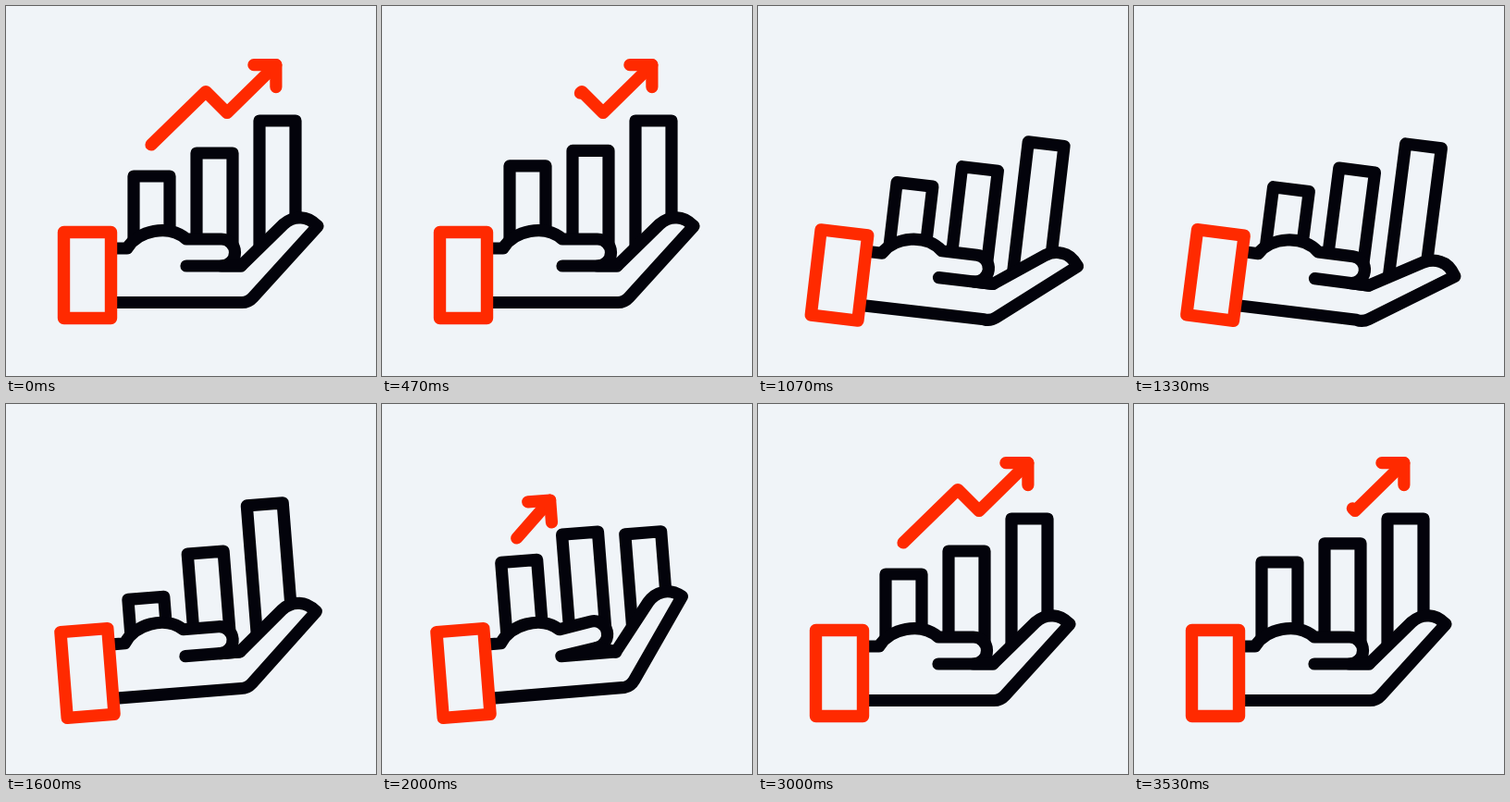
An HTML page with a canvas that plays this animation: 400 px wide and 400 px high, repeating every 3.6 s.

```html
<!DOCTYPE html>
<html lang="en">
<head>
<meta charset="utf-8">
<title>Growth in hand</title>
<style>
html, body { margin: 0; width: 100%; height: 100%; overflow: hidden; background: #f0f4f8; }
canvas { display: block; width: 400px; height: 400px; }
</style>
</head>
<body>
<canvas id="stage" width="400" height="400"></canvas>
<script>
const ctx = document.getElementById('stage').getContext('2d');
const BG = '#f0f4f8', RED = '#ff2a00', INK = '#03030b', WEIGHT = 13.2;
const LOOP = 3600, CYCLE = 3000, STEP = 1000 / 15;
const CUFF = [88, 291], KNUCKLE = [254, 281], THUMB = [193, 270];
const rad = deg => deg * Math.PI / 180;

// Monotone cubic through [time, value] keys
function track(keys) {
  const slope = i => (keys[i + 1][1] - keys[i][1]) / (keys[i + 1][0] - keys[i][0]);
  const tangent = i => {
    if (i === 0 || i === keys.length - 1) return 0;
    const a = slope(i - 1), b = slope(i);
    return a * b <= 0 ? 0 : 2 * a * b / (a + b);
  };
  return t => {
    if (t <= keys[0][0]) return keys[0][1];
    const i = keys.findIndex(k => k[0] >= t) - 1;
    if (i < 0) return keys[keys.length - 1][1];
    const [t0, v0] = keys[i], [t1, v1] = keys[i + 1], w = t1 - t0;
    const u = (t - t0) / w, u2 = u * u, u3 = u2 * u;
    return v0 * (2 * u3 - 3 * u2 + 1) + v1 * (3 * u2 - 2 * u3)
      + w * (tangent(i) * (u3 - 2 * u2 + u) + tangent(i + 1) * (u3 - u2));
  };
}

const tilt = track([[870, 0], [1070, 6.8], [1200, 9.3], [1333, 7.3], [1600, -4.5],
  [1800, -5.6], [2000, -4.5], [2130, -1.5], [2270, 0]]);
const flex = track([[870, 0], [1070, 9], [1260, 15], [1333, 14], [1600, 4],
  [1800, -5], [1940, -8.5], [2000, -8], [2270, 0]]);
const dip = track([[1220, 0], [1333, 4.5], [1400, 12], [1600, 31], [1800, -9],
  [1900, -13], [2000, -9], [2133, 0]]);
const tailOut = track([[300, 0], [533, 111], [800, 160], [960, 245]]);
const headOut = track([[560, 189], [800, 217], [940, 253]]);
const headIn = track([[1890, 0], [2200, 189]]);
const fadeSize = track([[900, 1], [990, 0]]);

const bars = [
  { x: 138, top: 184, bottom: 262, hop: 13 },
  { x: 206, top: 159, bottom: 260, hop: 16 },
  { x: 274, top: 124, hop: 13 }
];

function hop(t, peak) {
  const d = Math.abs(t - peak) / 270;
  return d < 1 ? Math.cos(d * Math.PI / 2) ** 2 : 0;
}

function rotateAbout([x, y], deg) {
  ctx.translate(x, y);
  ctx.rotate(rad(deg));
  ctx.translate(-x, -y);
}

function turned(x, y, [px, py], deg) {
  const c = Math.cos(rad(deg)), s = Math.sin(rad(deg));
  const dx = x - px, dy = y - py;
  return [px + dx * c - dy * s, py + dx * s + dy * c];
}

function stroke(color, width) {
  ctx.strokeStyle = color;
  ctx.lineWidth = width;
  ctx.stroke();
}

function drawBars(t, bow) {
  const fingerY = (x, y) => turned(x, y, KNUCKLE, bow)[1] + 2;
  bars.forEach((bar, i) => {
    const top = bar.top + dip(t - i * 200) - bar.hop * hop(t, 533 + i * 133);
    ctx.lineCap = 'butt';
    ctx.beginPath();
    ctx.moveTo(bar.x, bar.bottom || fingerY(274, 262));
    ctx.lineTo(bar.x, top);
    ctx.lineTo(bar.x + 39, top);
    ctx.lineTo(bar.x + 39, bar.bottom || fingerY(313, 230));
    stroke(INK, WEIGHT);
  });
}

function drawHand(bow) {
  // The thumb only curls upwards.
  const curl = Math.min(0, bow) * 1.1;
  const finger = (x, y) => turned(x, y, KNUCKLE, bow);
  const thumb = (x, y) => turned(x, y, THUMB, curl);
  const palm = new Path2D();
  palm.moveTo(114, 262);
  palm.lineTo(131, 262);
  palm.bezierCurveTo(142, 243, 176, 235, 195, 252);
  palm.lineTo(...thumb(233, 252));
  palm.arc(...thumb(233, 266.5), 14.5, rad(curl - 90), rad(curl + 90));
  palm.lineTo(...KNUCKLE);
  palm.lineTo(...finger(300, 236));
  palm.quadraticCurveTo(...finger(308, 229), ...finger(317, 229));
  palm.quadraticCurveTo(...finger(327, 228), ...finger(337, 238));
  palm.lineTo(...finger(267, 315));
  palm.quadraticCurveTo(...finger(262, 320.5), ...finger(255, 320.5));
  palm.lineTo(114, 320.5);
  ctx.fillStyle = BG;
  ctx.fill(palm);
  ctx.strokeStyle = INK;
  ctx.lineWidth = WEIGHT;
  ctx.stroke(palm);

  ctx.beginPath();
  ctx.moveTo(195, 281);
  ctx.lineTo(...thumb(233, 281));
  ctx.lineTo(...KNUCKLE);
  ctx.closePath();
  ctx.fillStyle = INK;
  ctx.fill();
  stroke(INK, WEIGHT);
}

function drawCuff() {
  ctx.beginPath();
  ctx.rect(62.5, 244.5, 51, 93);
  ctx.fillStyle = BG;
  ctx.fill();
  stroke(RED, 13.4);
}

// The last leg runs on past the resting tip so the arrow can fly off.
const route = [[157, 150], [216, 92.5], [239, 115.5], [293, 62.5], [353, 3.5]];
const legs = route.slice(1).map(([x, y], i) => Math.hypot(x - route[i][0], y - route[i][1]));

function along(s) {
  let i = 0;
  while (i < legs.length - 1 && s > legs[i]) s -= legs[i++];
  const u = s / legs[i], [x0, y0] = route[i], [x1, y1] = route[i + 1];
  return [x0 + (x1 - x0) * u, y0 + (y1 - y0) * u];
}

function drawArrow(tail, head, size) {
  const tip = along(head), back = along(head - 12);
  const turn = Math.atan2(tip[1] - back[1], tip[0] - back[0]) + rad(44.4);
  ctx.lineCap = 'round';
  ctx.beginPath();
  ctx.moveTo(...along(tail));
  let at = 0;
  for (let i = 0; i < legs.length; i++) {
    at += legs[i];
    if (at > tail && at < head) ctx.lineTo(...route[i + 1]);
  }
  ctx.lineTo(...tip);
  stroke(RED, WEIGHT * size);

  ctx.save();
  ctx.translate(...tip);
  ctx.rotate(turn);
  ctx.scale(size, size);
  ctx.beginPath();
  ctx.moveTo(-24, 0);
  ctx.lineTo(0, 0);
  ctx.lineTo(0, 24);
  stroke(RED, WEIGHT);
  ctx.restore();
}

function draw(t) {
  const bow = flex(t);
  ctx.fillStyle = BG;
  ctx.fillRect(0, 0, 400, 400);
  ctx.lineJoin = 'round';
  ctx.save();
  rotateAbout(CUFF, tilt(t));
  drawBars(t, bow);
  drawHand(bow);
  drawCuff();
  if (t > 1900) drawArrow(0, headIn(t), Math.min(1, headIn(t) / 24));
  ctx.restore();
  if (t < 985) drawArrow(tailOut(t), headOut(t), fadeSize(t));
}

const start = performance.now();
function tick() {
  // Each pose is held; the small lead absorbs rounding to 10 ms.
  const t = (performance.now() - start) % LOOP;
  const held = Math.floor((t + 5) / STEP) * STEP;
  draw(held % LOOP % CYCLE);
  requestAnimationFrame(tick);
}
tick();
</script>
</body>
</html>
```
